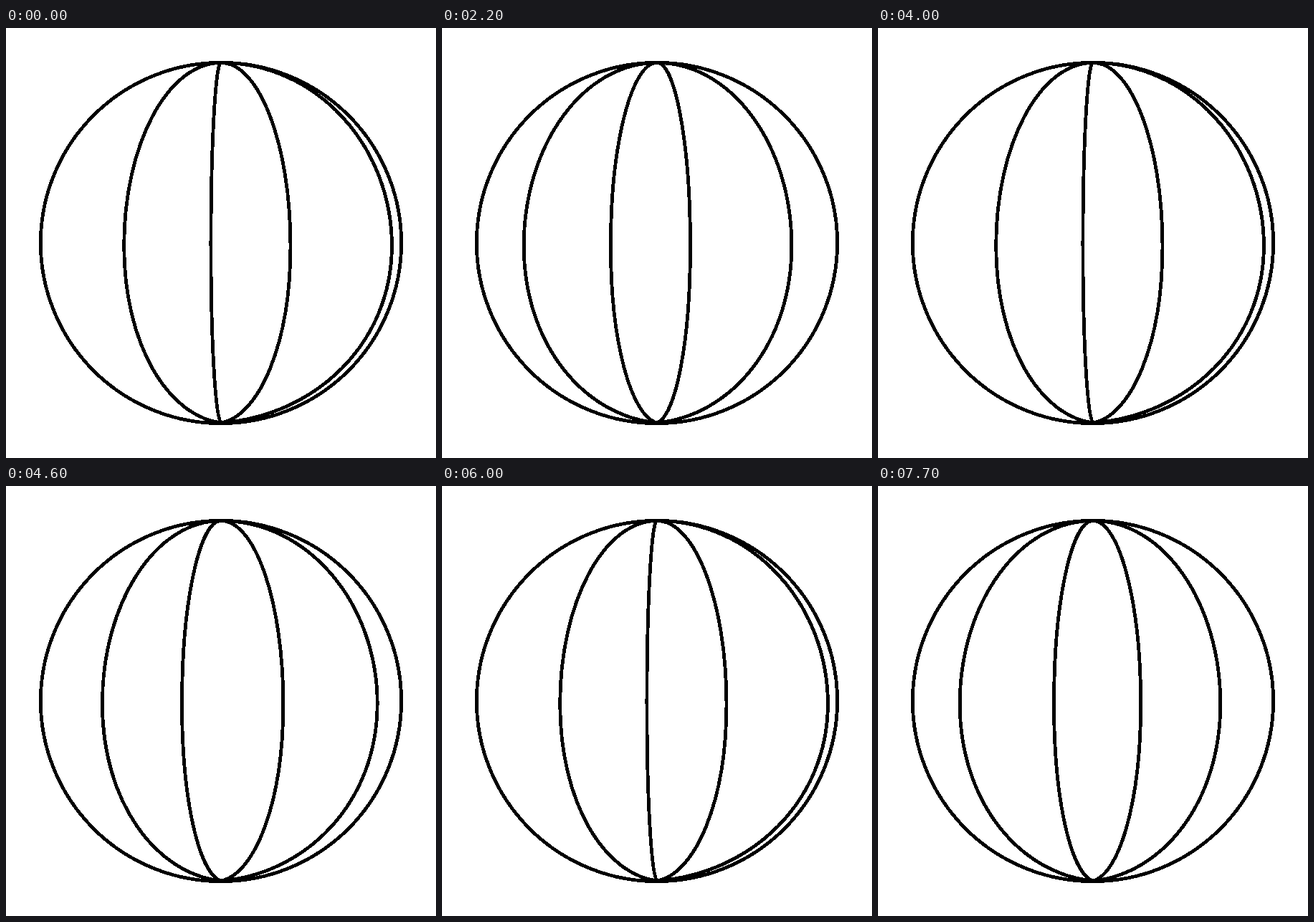
These frames come from a looping animation (600 px wide and 600 px high, 7800 ms). An HTML page:

```html
<!DOCTYPE html>
<html lang="en">
<head>
<meta charset="utf-8">
<title>Turning globe</title>
<style>
  html, body { margin: 0; width: 100%; height: 100%; overflow: hidden; background: #fff; }
  svg { display: block; width: 100%; height: 100%; }
</style>
</head>
<body>
<svg viewBox="0 0 600 600" fill="none" stroke="#000" stroke-width="4.8" shape-rendering="crispEdges">
  <circle cx="300" cy="300" r="251.7"/>
  <path id="meridians"/>
</svg>
<script>
  const LOOP = 7800, TICK = 100;
  const SLOTS = 50, SLOT_WIDTH = 10.1, FIRST_X = -246.4;
  const TOP = 48.5, MIDDLE = 304, BOTTOM = 551, LIFT = 10;
  const ROUND = 0.5523; // handle length of a quarter ellipse
  const starts = [11, 23, 34, 48];
  const path = document.getElementById('meridians');

  // Two quarter curves from pole to pole; the lifted last handle makes the lower pole pointed
  function meridian(x) {
    const side = 300 + x, handle = 300 + x * ROUND;
    const upper = MIDDLE - (MIDDLE - TOP) * ROUND;
    const lower = MIDDLE + (BOTTOM - MIDDLE) * ROUND;
    return `M300 ${TOP}C${handle} ${TOP} ${side} ${upper} ${side} ${MIDDLE}` +
      `C${side} ${lower} ${handle} ${BOTTOM - LIFT} 300 ${BOTTOM}`;
  }

  function draw(time) {
    const step = Math.floor((time % LOOP) / TICK);
    const shift = Math.floor(step * 2.5) % SLOTS;
    path.setAttribute('d', starts.map(start => {
      const slot = (start - shift + SLOTS) % SLOTS;
      return meridian(FIRST_X + slot * SLOT_WIDTH);
    }).join(''));
  }

  const begin = performance.now();
  function frame() {
    draw(performance.now() - begin);
    requestAnimationFrame(frame);
  }
  frame();
</script>
</body>
</html>
```
